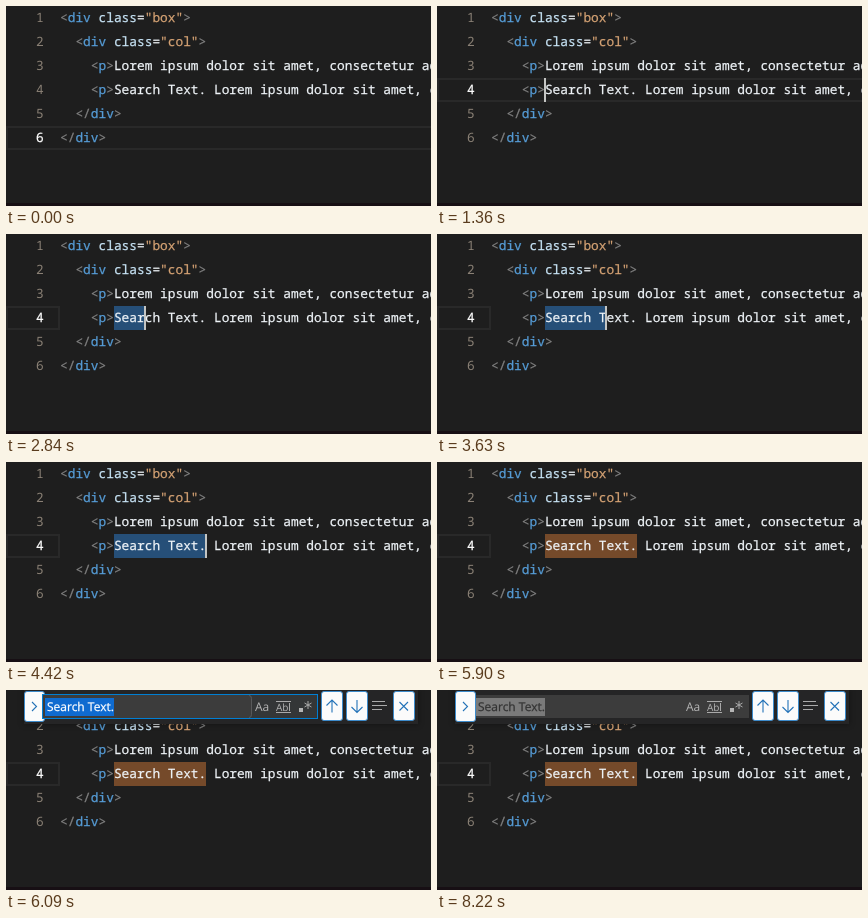
Animation, 425 px wide and 200 px high, one loop 8.32 s. Source, as an HTML page:

```html
<!DOCTYPE html>
<html lang="en">
<head>
<meta charset="utf-8">
<title>Find selection</title>
<style>
  html, body { margin: 0; width: 100%; height: 100%; overflow: hidden; background: #1e1e1e; }
  svg { display: block; width: 425px; height: 200px; }
  text { white-space: pre; text-rendering: geometricPrecision; }
  .code text { font: 12.8333px "Noto Sans Mono", "DejaVu Sans Mono", monospace; stroke-width: .25; }
  .ui { font: 12px "Open Sans", "Noto Sans", sans-serif; }
  .punct { fill: #808080; stroke: #808080; }
  .tag { fill: #569cd6; stroke: #569cd6; }
  .attr { fill: #c6e2f4; stroke: #c6e2f4; }
  .str { fill: #d3a173; stroke: #d3a173; }
  .plain { fill: #eef3f7; stroke: #eef3f7; }
  .num { fill: #8a8075; }
  .num.on { fill: #fff; stroke: #fff; }
  .btn { fill: #fbfbfb; stroke: #3d8bcb; }
  .blue { fill: none; stroke: #2473b8; stroke-width: 1.1; }
  .grey { fill: none; stroke: #a9a9a9; stroke-width: 1; }
  .lbl { fill: #b5b5b5; }
</style>
</head>
<body>
<svg viewBox="0 0 425 200">
  <rect width="425" height="200" fill="#1e1e1e"/>
  <rect y="197" width="425" height="3" fill="#170f14"/>
  <rect id="row" x="1" height="22" fill="none" stroke="#292929" stroke-width="2"/>
  <g id="marks" fill="#343a41"></g>
  <rect id="sel" x="108" y="72" height="24"/>
  <g id="code" class="code"></g>
  <rect id="caret" y="72" width="2" height="24" fill="#c4c5c3"/>

  <g id="find">
    <rect x="18" width="394" height="34" fill="#252526" style="filter:drop-shadow(0 0 3px rgba(0,0,0,.4))"/>
    <rect class="btn" x="18.5" y="1.5" width="20" height="30" rx="2.5"/>
    <path class="blue" d="M26 12l4.5 4.5-4.5 4.5"/>
    <rect id="input" y="5" height="23"/>
    <g id="inner">
      <path d="M37 5H243q3 0 3 3V25q0 3-3 3H37z" fill="#3c3c3c"/>
      <path d="M243 5.5q2.5 0 2.5 3V24.5q0 3-2.5 3" fill="none" stroke="#58595a"/>
    </g>
    <rect id="picked" x="39" y="8" width="69" height="18"/>
    <text id="query" class="ui" x="41" y="21" stroke-width=".25">Search Text.</text>
    <text class="ui lbl" x="249" y="21">Aa</text>
    <text class="ui lbl" x="270" y="21" style="font-size:10px">Ab</text>
    <path class="grey" d="M270 11.5H285M270 22.5H285M283.5 13V21"/>
    <rect class="lbl" x="293" y="18" width="4" height="4"/>
    <path class="grey" d="M302 11V19M298.5 13L305.5 17M305.5 13L298.5 17"/>
    <rect class="btn" x="315.5" y="1.5" width="21" height="29" rx="2.5"/>
    <path class="blue" d="M326 22.5V10M320.5 15.5L326 10L331.5 15.5"/>
    <rect class="btn" x="340.5" y="1.5" width="21" height="29" rx="2.5"/>
    <path class="blue" d="M351 10V22.5M345.5 17L351 22.5L356.5 17"/>
    <path class="grey" d="M366 11.5H379M366 15.5H381M366 19.5H376"/>
    <rect class="btn" x="387.5" y="1.5" width="21" height="29" rx="2.5"/>
    <path class="blue" d="M393.5 12L402 20.5M402 12L393.5 20.5"/>
  </g>
</svg>
<script>
const LOOP = 8320, CHAR = 7.7, LEFT = 54, LINE = 24;
const NS = "http://www.w3.org/2000/svg";
const $ = id => document.getElementById(id);
const colX = col => LEFT + col * CHAR;

function set(el, attrs) {
  for (const k in attrs) el.setAttribute(k, attrs[k]);
  return el;
}
function add(parent, name, attrs, text = "") {
  const el = set(document.createElementNS(NS, name), attrs);
  el.textContent = text;
  return parent.appendChild(el);
}

const LOREM = "Lorem ipsum dolor sit amet, consectetur adipiscing";
const open = (tag, value) => [["punct", "<"], ["tag", tag],
  ...(value ? [["attr", " class"], ["plain", "="], ["str", `"${value}"`]] : []), ["punct", ">"]];
const close = tag => [["punct", "</"], ["tag", tag], ["punct", ">"]];
const lines = [
  [0, open("div", "box")],
  [2, open("div", "col")],
  [4, [...open("p"), ["plain", LOREM]]],
  [4, [...open("p"), ["plain", "Search Text. " + LOREM]]],
  [2, close("div")],
  [0, close("div")]
];
const nums = lines.map(([indent, tokens], i) => {
  const y = i * LINE + 16;
  const line = add($("code"), "text", { x: colX(indent), y });
  for (const [cls, text] of tokens) add(line, "tspan", { class: cls }, text);
  return add($("code"), "text", { x: 30, y, class: "num" }, i + 1);
});

// Other occurrences of the selected letters: line, column, length
function markGroup(list) {
  const g = add($("marks"), "g", {});
  for (const [line, col, len] of list)
    add(g, "rect", { x: colX(col), y: line * LINE, width: len * CHAR, height: LINE });
  return g;
}
const marks = [
  markGroup([[0, 8, 2], [1, 10, 2], [2, 15, 1], [2, 25, 1], [2, 38, 1], [3, 28, 1], [3, 38, 1]]),
  markGroup([[2, 38, 2]])
];

const CLICK = 1310, FIND = 5900, BLUR = 8220;
const keys = [2230, 2460, 2660, 2840, 3020, 3170, 3350, 3630, 3810, 3990, 4190, 4420];
const show = (el, on) => el.setAttribute("visibility", on ? "visible" : "hidden");

function draw(t) {
  const count = keys.filter(k => k <= t).length;
  const finding = t >= FIND;
  const active = t < CLICK ? 5 : 3;

  nums.forEach((n, i) => n.classList.toggle("on", i === active));
  set($("row"), { y: active * LINE + 1, width: count ? 52 : 440 });
  marks.forEach((g, i) => show(g, count === i + 1));
  set($("sel"), { width: Math.round(count * CHAR), fill: finding ? "#754a2a" : "#264f78" });

  const blink = (t >= 1820 && t < keys[0]) || (t >= 4930 && t < 5420);
  $("caret").setAttribute("x", Math.round(colX(7) - 1.05 + count * CHAR));
  show($("caret"), t >= CLICK && !finding && !blink);

  // The panel drops in four even steps
  const p = Math.max(0, Math.min(4, Math.floor((t - 5940) / 50) + 1)) / 4;
  $("find").setAttribute("transform", `translate(0 ${-43 * (1 - p)})`);
  $("find").setAttribute("display", p ? "inline" : "none");

  const focus = t < BLUR;
  set($("input"), focus
    ? { x: 36.5, y: 4.5, width: 275, height: 24, fill: "#343637", stroke: "#007fd4" }
    : { x: 39, y: 5, width: 273, height: 23, fill: "#3c3c3c", stroke: "none" });
  $("inner").setAttribute("display", focus ? "inline" : "none");
  $("picked").setAttribute("fill", focus ? "#0f6bd0" : "#7a7a7a");
  const ink = focus ? "#ffffff" : "#333333";
  set($("query"), { fill: ink, stroke: ink });
}

const start = performance.now();
function tick() {
  draw((performance.now() - start) % LOOP);
  requestAnimationFrame(tick);
}
tick();
</script>
</body>
</html>
```
